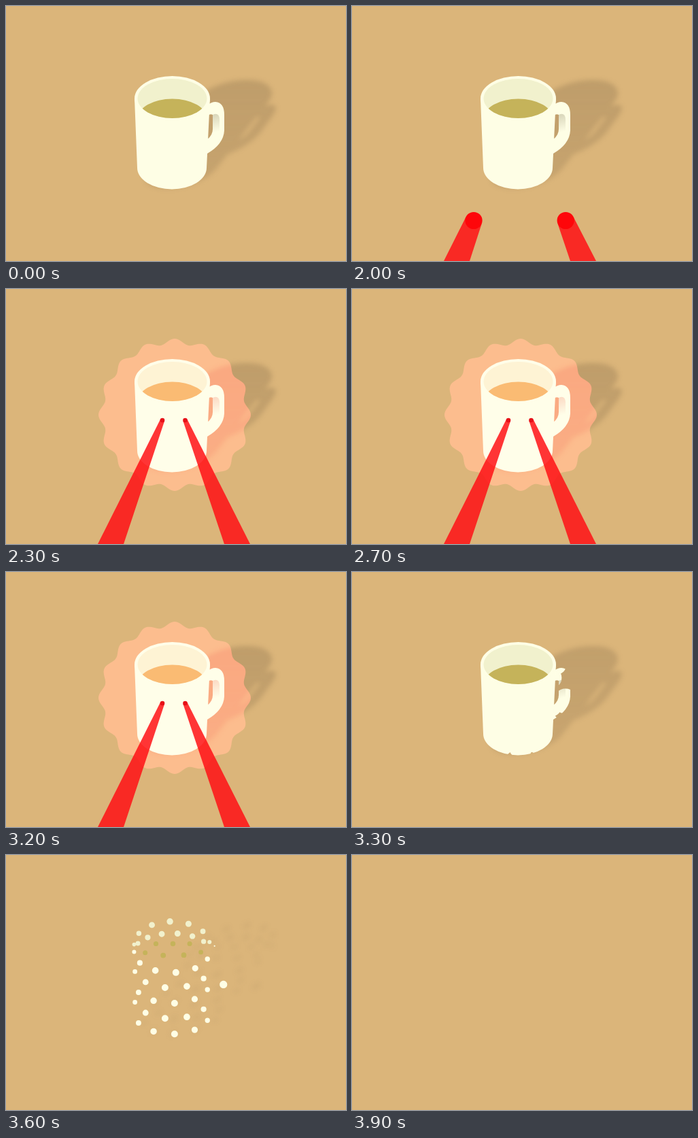
Recreate the animation shown at these times as an HTML page with a canvas. Size 500 px wide and 375 px high, loop 4900 ms.

```html
<!DOCTYPE html>
<html lang="en">
<head>
<meta charset="utf-8">
<title>Mug and beams</title>
<style>
  html, body { margin: 0; width: 100%; height: 100%; overflow: hidden; background: #dbb57a; }
  canvas { display: block; width: 100vw; height: 100vh; }
</style>
</head>
<body>
<canvas id="stage" width="500" height="375"></canvas>
<script>
const ctx = document.getElementById('stage').getContext('2d');
const LOOP = 4900, TAU = Math.PI * 2;
const CREAM = '#fefee5', INSIDE = '#f1f1cd', COFFEE = '#c5b35a';

function ellipse(x, y, rx, ry) {
  const p = new Path2D();
  p.ellipse(x, y, rx, ry, 0, 0, TAU);
  return p;
}

const body = new Path2D('M300 136 L295 238 A51 31.5 0 0 1 193 238 L189 136 Z');
const handle = new Path2D(`M296 146 Q302 141 308 141 Q321 142 321 160 V183
  Q320 203 296 217 V196 Q304 190 304 181 V160 Q301 158 296 161 Z`);
const innerFace = new Path2D('M304 160 Q313 156 314 166 V186 H304 Z');
const rim = ellipse(244.5, 136, 55.5, 33);
const opening = ellipse(244.5, 136, 51, 29);
const surface = ellipse(244.5, 165.5, 51, 29);
const outline = new Path2D();
[body, handle, rim].forEach(p => outline.addPath(p));

// The mug breaks into rows of droplets that follow its curves.
function row(color, size, y, ry, from, to, count) {
  return Array.from({ length: count }, (_, i) => {
    const a = (from + (to - from) * i / (count - 1)) * TAU / 360;
    return {
      color, x: 244.5 - 51 * Math.cos(a), y: y + ry * Math.sin(a),
      r: size * (.6 + .4 * Math.sin(a))
    };
  });
}
const drops = [
  ...row(INSIDE, 6.3, 136, -31, 0, 174, 7),
  ...row(INSIDE, 6, 145, -24, 26, 147, 6),
  ...row(COFFEE, 5, 135, 0, 65, 118, 3),
  ...row(COFFEE, 5.3, 138, 13, 45, 140, 4),
  { color: CREAM, x: 302, y: 138, r: 1.5 },
  { color: CREAM, x: 314, y: 190, r: 7.5 }
];
for (let k = 0; k < 5; k++) {
  const from = k % 2 ? 12 : k && 28;
  drops.push(...row(CREAM, 6.7, 146 + 20.7 * k, 28, from, k % 2 ? 147 : 160, k ? 5 : 6));
}

function dots(list, spread, size) {
  const p = new Path2D();
  for (const d of list) {
    const x = 250 + (d.x - 250) * spread, y = 185 + (d.y - 185) * spread, r = size(d.r);
    p.moveTo(x + r, y);
    p.arc(x, y, r, 0, TAU);
  }
  return p;
}

function fill(path, color) {
  ctx.fillStyle = color;
  ctx.fill(path);
}

// Shadow: the same shape, slanted away from the light
function drawShadow(path, alpha) {
  const g = ctx.createLinearGradient(0, 105, 0, 265);
  g.addColorStop(0, 'rgba(119,96,66,.28)');
  g.addColorStop(1, 'rgba(119,96,66,.2)');
  ctx.save();
  ctx.globalAlpha = alpha;
  ctx.filter = 'blur(3.5px)';
  ctx.transform(1, 0, -.7, .96, 181.5, 9.8);
  fill(path, g);
  ctx.restore();
}

function drawMug() {
  fill(handle, CREAM);
  const g = ctx.createLinearGradient(306, 160, 310, 185);
  g.addColorStop(0, 'rgba(160,152,120,.38)');
  g.addColorStop(1, 'rgba(160,152,120,0)');
  fill(innerFace, g);
  fill(body, CREAM);
  fill(rim, CREAM);
  fill(opening, INSIDE);
  ctx.save();
  ctx.clip(opening);
  fill(surface, COFFEE);
  ctx.restore();
}

function drawFlash() {
  const p = new Path2D();
  for (let i = 0; i < 360; i++) {
    const a = i * TAU / 360, r = 108 + 4 * Math.cos(16 * a);
    p.lineTo(248 + r * Math.cos(a), 185 + r * Math.sin(a));
  }
  ctx.globalCompositeOperation = 'screen';
  fill(p, 'rgb(234,28,38)');
  ctx.globalCompositeOperation = 'source-over';
}

function drawBeam(left, right, x, y, r, tipColor) {
  const dx = x - (left + right) / 2, dy = y - 375, d = Math.hypot(dx, dy);
  const nx = -dy / d * r, ny = dx / d * r;
  const p = new Path2D();
  p.moveTo(left, 375);
  p.lineTo(x - nx, y - ny);
  p.lineTo(x + nx, y + ny);
  p.lineTo(right, 375);
  fill(p, 'rgba(255,15,20,.84)');
  fill(ellipse(x, y, r, r), tipColor);
}

function drawBeams(hit) {
  const y = hit ? 193 : 315.5, r = hit ? 3.3 : 12.6;
  const color = hit ? '#e61018' : '#fe060a';
  drawBeam(135, 173, hit ? 230 : 179, y, r, color);
  drawBeam(321, 359, hit ? 263.5 : 314.2, y, r, color);
}

function drawBreakup(step) {
  if (step < 2) {
    const grow = step ? 4 : 11;
    drawShadow(outline, step ? .6 : .9);
    ctx.save();
    ctx.clip(dots(drops, 1, r => r + grow));
    drawMug();
    ctx.restore();
    return;
  }
  const n = step - 2, spread = 1 + .09 * n, size = r => r * (1 - n / 4);
  if (n < 2) drawShadow(dots(drops, spread, size), .6 - .3 * n);
  for (const color of [INSIDE, COFFEE, CREAM]) {
    fill(dots(drops.filter(d => d.color === color), spread, size), color);
  }
}

function draw(t) {
  ctx.fillStyle = '#dbb57a';
  ctx.fillRect(0, 0, 500, 375);
  if (t >= 3900) return;
  if (t >= 3300) return drawBreakup(Math.floor((t - 3300) / 100));
  drawShadow(outline, 1);
  drawMug();
  const flash = [[2300, 2500], [2700, 3000], [3200, 3300]].some(([a, b]) => t >= a && t < b);
  if (flash) drawFlash();
  if (t >= 2000) drawBeams(t >= 2100);
}

const start = performance.now();
function tick() {
  draw((performance.now() - start) % LOOP);
  requestAnimationFrame(tick);
}
tick();
</script>
</body>
</html>
```
